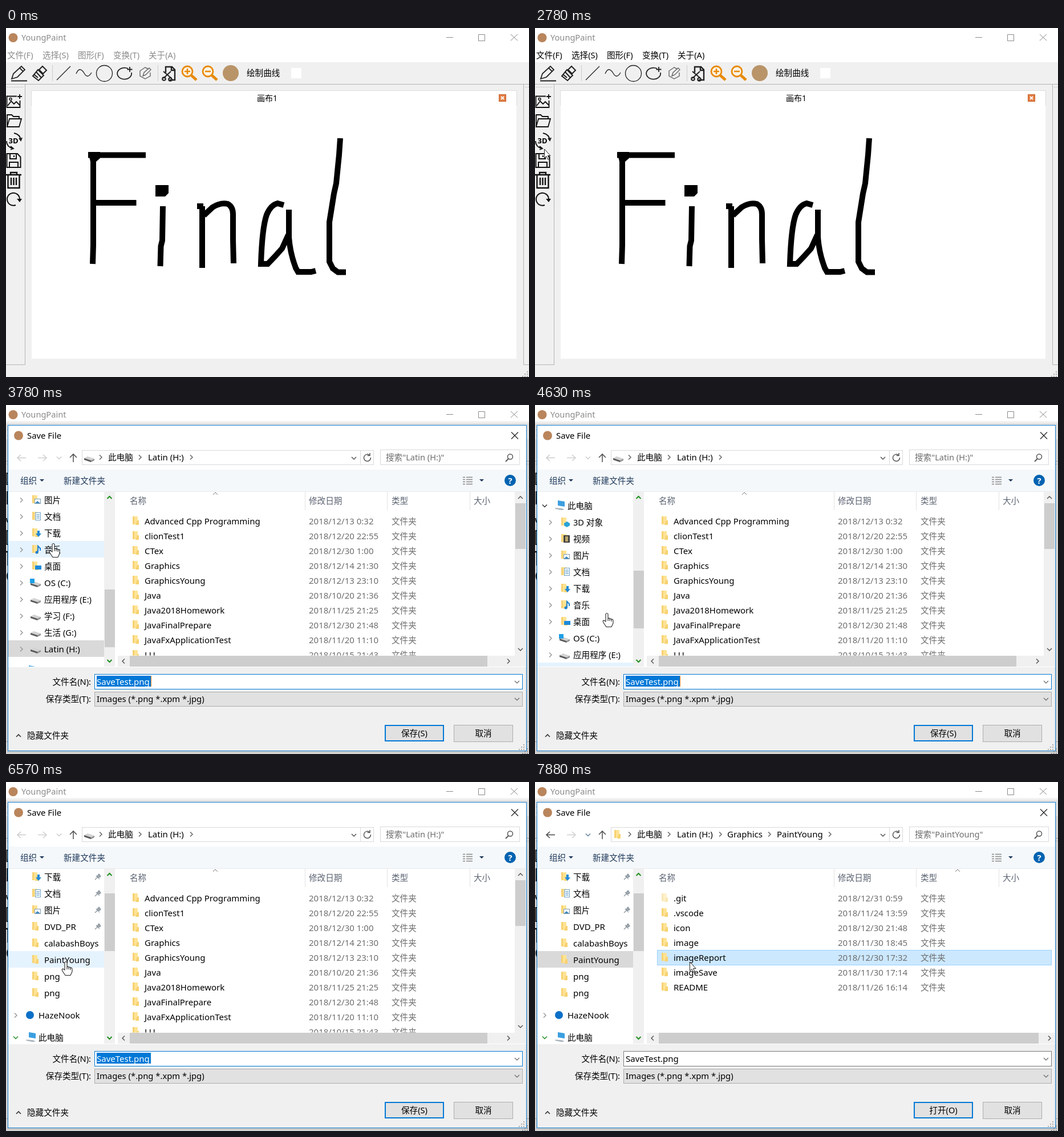
An HTML page that plays this animation: 917x611 px, repeating every 8000 ms.

```html
<!DOCTYPE html>
<html lang="zh-CN">
<head>
<meta charset="utf-8">
<title>Paint</title>
<style>
html, body { margin: 0; width: 100%; height: 100%; overflow: hidden; background: #fff; }
svg { display: block; width: 917px; height: 611px; font-family: "Noto Sans", "Noto Sans CJK SC", "Noto Sans CJK", sans-serif; }
</style>
</head>
<body>
<svg id="stage" viewBox="0 0 917 611"></svg>
<script>
const LOOP = 8000;
const stage = document.getElementById('stage');

const rect = (x, y, w, h, fill, stroke = 'none', sw = 1) =>
  `<rect x="${x}" y="${y}" width="${w}" height="${h}" fill="${fill}" stroke="${stroke}" stroke-width="${sw}"/>`;
const line = (d, color = '#222', w = 1, fill = 'none') =>
  `<path d="${d}" fill="${fill}" stroke="${color}" stroke-width="${w}"/>`;
const shape = (d, fill) => `<path d="${d}" fill="${fill}"/>`;
const disc = (x, y, r, fill, stroke = 'none', w = 1) =>
  `<circle cx="${x}" cy="${y}" r="${r}" fill="${fill}" stroke="${stroke}" stroke-width="${w}"/>`;
const group = (x, y, body) => `<g transform="translate(${x} ${y})">${body}</g>`;

// y is the optical middle of the line; Latin runs are set a touch larger than Chinese ones
function text(s, x, y, color = '#000', anchor = 'start', size) {
  size = size || (/[^\x00-\x7f]/.test(s) ? 14.6 : 15);
  return `<text x="${x}" y="${y + 5.3}" font-size="${size}" fill="${color}" text-anchor="${anchor}">${s}</text>`;
}

const TURNS = { right: 'M-2-4L2 0L-2 4', left: 'M2-4L-2 0L2 4', down: 'M-4-2L0 2L4-2', up: 'M-4 2L0-2L4 2' };
const chevron = (dir, x, y, color = '#555', w = 1.5) => group(x, y, line(TURNS[dir], color, w));
const triangle = (x, y) => shape(`M${x - 4} ${y - 2}h8l-4 4z`, '#1e395b');

function grip(x, y) {
  let s = '';
  for (let i = 0; i < 3; i++) for (let j = 0; j <= i; j++) s += rect(x - j * 4, y - 8 + i * 4, 2, 2, '#aaa');
  return s;
}

/* ---------- paint window ---------- */

const toolbar =
  line('M10 89L13 80L27 67L33 73L20 86ZM24 70L30 76M9 92.5H37', '#222', 1.8) +
  line('M64 67L71 74L65 80L58 73ZM56 73L66 83L57 92L47 84ZM53 77L62 87M50 82L56 87', '#222', 2) +
  line('M81.5 65V93M266.5 65V93', '#ccc') +
  line('M89 91L113 67M123 80Q129 66 137 79Q143 90 150 78', '#222', 1.3) +
  disc(172.5, 79.5, 14, 'none', '#222', 1.3) +
  line('M214 71A12.5 10 0 1 0 220 78M217 68V77M212.500 72.500H221.500', '#222', 1.8) +
  line('M250 72L244 69L235 75V84L244 89L253 84V78M240 84L242 78L251 70L254 73L245 82Z', '#666', 1.4) +
  line('M280 78V68H291L296 73V91H287M290 68V74H296', '#222', 2.4) +
  line('M276 76L290 88M276 88L289 76', '#222', 2) +
  disc(277, 89, 2.8, 'none', '#222', 2) + disc(288, 90, 2.8, 'none', '#222', 2) +
  [0, 36].map(dx => group(dx, 0,
    disc(318, 76, 9, '#fff6e6', '#e88a08', 2.8) +
    line('M325 83L334 91', '#e88a08', 5) +
    line(dx ? 'M313 76H323' : 'M313 76H323M318 71V81', '#e88a08', 2.6))).join('') +
  disc(394, 79, 14, '#b99468') +
  text('绘制曲线', 422, 78.5) + rect(500, 70, 18, 18, '#fff');

const dock =
  line('M19 119.500H1.500V139H24.500V127M24 116V124M20 120H28M3 136L9 128L14 133L18 129L24 135', '#111', 1.8) +
  disc(8, 124.5, 2, 'none', '#111', 1.5) +
  line('M2 172V152H10L13 155H23V159M2 173L6 159H27L23 173Z', '#111', 1.8) +
  line('M14 184Q25 186 26 197M23 193L26 197L28 192M12 211Q1 208 1 198M8 207L13 211L8 213', '#111', 1.8) +
  `<text x="13" y="202" font-size="13" font-weight="700" text-anchor="middle">3D</text>` +
  line('M1.500 220H20L25.500 226V244H1.500ZM7 220V229H18V220M6 244V235H21V244M14 223V226', '#111', 2) +
  line('M0 257H27M8 257V253H19V257M3.500 257V280H23.500V257M9 262V275M13.500 262V275M18 262V275', '#111', 2.4) +
  line('M17 310A11 11 0 1 1 24 299', '#111', 2) + shape('M19 299H28L24 305Z', '#111');

const lettering = line(
  'M144 222.500H245M153 218V380L152 413M158 306H228.500' +
  'M275 312L274 372L271.500 382L270.500 417M335 312H346M344 312V420' +
  'M347 328L362 314Q376 305 389 308Q398 313 398 326V370L399 412' +
  'M487 310L476 307Q464 310 457 327Q449 350 447 413L459 413Q472 400 484 386L495 362' +
  'M496 318V366Q498 394 508 420L512 427H535L543 425' +
  'M586 193L584 222L579 272L575 290L567 340V409L573 421L582 427.500H596', '#000', 10) +
  shape('M144 217H165V228L158 234H148ZM262 275H285V289L279 295H262Z', '#000');

function paintWindow(t) {
  const active = t >= 1820 && t < 2700;
  const ink = active ? '#000' : '#8a8a8a';
  const menuInk = t >= 1820 ? '#000' : '#8a8a8a';
  const menus = ['文件(F)', '选择(S)', '图形(F)', '变换(T)', '关于(A)'];
  const saveHot = t >= 1500 && t < 2380;
  const spinHot = t >= 1340 && t < 1500;
  return rect(0, 0, 917, 611, '#f0f0f0') + rect(0, 0, 917, 60, '#fff') +
    disc(12.5, 17, 8, '#b9855c') + text('YoungPaint', 27, 16.5, ink, 'start', 14.6) +
    line('M772 16.500H784M828.500 11.500H839.500V22.500H828.500ZM885 11L897 22M897 11L885 22', ink) +
    menus.map((m, i) => text(m, 2 + i * 62, 47.5, menuInk)).join('') +
    line('M0 98.500H917M33.500 98V589.500H0M907.500 98V589.500H917', '#b4b4b4') +
    `<path d="M2 103.500H32M910 103.500H917" stroke="#999" stroke-dasharray="1 2"/>` +
    (spinHot ? rect(0, 180, 31, 34, '#d8e6f2') : '') +
    (saveHot ? rect(0, 214, 31, 34, t >= 1820 && t < 1990 ? '#c0dcf3' : '#d8e6f2') : '') +
    toolbar + dock +
    rect(45, 110, 850, 469, '#fff') + line('M44.500 136V109.500H895.500V136', '#dcdcdc') +
    text('画布1', 458, 123, '#000', 'middle', 14) +
    rect(864.5, 116.5, 12, 12, '#e27d43', '#c9622b') + line('M868 120L873 125M873 120L868 125', '#fff', 1.8) +
    lettering + grip(913, 609);
}

/* ---------- save dialog ---------- */

const folder = (x, y, faint) =>
  `<g opacity="${faint ? .5 : 1}">` + rect(x, y - 8, 9, 14, '#ffe394') +
  shape(`M${x} ${y - 8}h3v14h-3zM${x + 8} ${y - 1}h3v8h-6z`, '#f7d272') + '</g>';
const drive = (x, y) => shape(`M${x} ${y}l6-3l12 4l-6 3z`, '#d2d2d2') +
  shape(`M${x} ${y}l12 4v3l-12-4z`, '#585858') + shape(`M${x + 12} ${y + 4}l6-3v3l-6 3z`, '#929292');
const monitor = (x, y) => shape(`M${x + 5} ${y - 9}l12 2v9l-12-2z`, '#3b9fe0') +
  shape(`M${x} ${y + 4}l12 1l5 2l-5 1l-11-2z`, '#a6b1ba');

const badges = {
  down: shape('M55-4h4v5h3l-5 6l-5-6h3z', '#2089d8'),
  doc: rect(51.5, -6.5, 9, 13, '#fff', '#6c9fc5') + line('M53-3h6M53 0h6M53 3h6', '#3d87bd'),
  pic: rect(50.5, -1.5, 10, 8, '#fff', '#7b9bb0') + shape('M51 6l4-4l5 4z', '#3d87bd'),
  music: line('M56 5V-6L60-2V2', '#1c7fd0', 2) + disc(54, 5, 2.5, '#1c7fd0'),
  desk: rect(51, -1, 11, 7, '#1c8adb'),
  cube: shape('M51 2l5-3l5 3v4l-5 3l-5-3z', '#27a3d8'),
  film: rect(50, -6, 11, 13, '#444') + rect(53, -4, 5, 9, '#b9a56a'),
};

// [label, icon, pinned]; tree y is each row's middle when scrolled to the quick-access group
const quick = [['下载', 'down', 1], ['文档', 'doc', 1], ['图片', 'pic', 1], ['DVD_PR', 'folder', 1],
  ['calabashBoys', 'folder'], ['PaintYoung', 'folder'], ['png', 'folder'], ['png', 'folder']];
const places = [['3D 对象', 'cube'], ['视频', 'film'], ['图片', 'pic'], ['文档', 'doc'], ['下载', 'down'],
  ['音乐', 'music'], ['桌面', 'desk'], ['OS (C:)', 'system'], ['应用程序 (E:)', 'drive'],
  ['学习 (F:)', 'drive'], ['生活 (G:)', 'drive'], ['Latin (H:)', 'drive']];
const tree = [
  ...quick.map(([label, icon, pin], i) => ({ label, icon, pin, quick: true, y: 166 + 29 * i })),
  { label: 'HazeNook', icon: 'cloud', top: true, y: 408 },
  { label: '此电脑', icon: 'pc', top: true, y: 447 },
  ...places.map(([label, icon], i) => ({ label, icon, y: 476 + 29 * i })),
  { label: '网络', icon: 'pc', top: true, y: 833 },
];

function treeIcon(icon) {
  if (icon === 'cloud') return disc(42, 0, 7, '#0a70c8');
  if (icon === 'pc') return monitor(35, 0);
  if (icon === 'drive') return drive(43, 1);
  if (icon === 'system') return drive(43, 1) + rect(42, -7, 8, 8, '#1fa0e6');
  return folder(46, 0) + (badges[icon] || '');
}

function treePane(t, cur) {
  const scroll = t < 4560 ? 368 : t < 4950 ? 271 : t < 5030 ? 180 : t < 5100 ? 90 : 0;
  const hoverScroll = t < 4720 ? 368 : scroll;
  const chosen = t < 6730 ? 'Latin (H:)' : 'PaintYoung';
  const chosenFill = t < 6730 || t >= 7880 ? '#d9d9d9' : '#cce8ff';
  let s = '';
  for (const item of tree) {
    const y = item.y - scroll;
    if (y < 130 || y > 480) continue;
    const hot = cur.x < 172 && Math.abs(cur.y - item.y + hoverScroll) < 14.5;
    const fill = item.label === chosen ? chosenFill : hot ? '#e5f3ff' : '';
    const open = item.label === '此电脑';
    s += group(0, y,
      (fill ? rect(4, -15, 168, 29, fill) : '') +
      (item.quick ? '' : chevron(open ? 'down' : 'right', item.top ? 17 : 27, 0.5,
        open ? (scroll ? '#333' : '#229022') : '#999')) +
      treeIcon(item.icon) + text(item.label, item.top ? 57 : 67, 0.4) +
      (item.pin ? line('M156 5L160 1M158-2L164 4M160-1L163-5L166-1L162 2Z', '#8a949c', 1.3, '#a4adb4') : ''));
  }
  return `<g clip-path="url(#treeClip)">${s}</g>` + rect(172, 152, 19, 306, '#f0f0f0') +
    rect(173, 195 + Math.round(scroll * .349), 18, 101, '#cdcdcd') +
    chevron('up', 181.5, 162, '#229022', 2) + chevron('down', 181.5, 448, '#229022', 2);
}

const driveRows = [['Advanced Cpp Programming', '12/13 0:32'], ['clionTest1', '12/20 22:55'],
  ['CTex', '12/30 1:00'], ['Graphics', '12/14 21:30'], ['GraphicsYoung', '12/13 23:10'],
  ['Java', '10/20 21:36'], ['Java2018Homework', '11/25 21:25'], ['JavaFinalPrepare', '12/30 21:48'],
  ['JavaFxApplicationTest', '11/20 11:10'], ['LU', '10/15 21:43']];
const projectRows = [['.git', '12/31 0:59'], ['.vscode', '11/24 13:59'], ['icon', '12/30 21:48'],
  ['image', '11/30 18:45'], ['imageReport', '12/30 17:32'], ['imageSave', '11/30 17:14'],
  ['README', '11/26 16:14']];

function listPane(t, cur, inside) {
  const rows = inside ? projectRows : driveRows;
  const hot = cur.x > 213 ? Math.floor((cur.y - 191) / 26) : -1;
  const body = rows.map(([name, date], i) => {
    const y = 204 + 26 * i;
    const picked = t >= 7800 && i === 4;
    return (picked ? rect(214.5, y - 13.5, 691, 26, '#cce8ff', '#99d1ff')
      : hot === i ? rect(214, y - 13, 692, 26, '#e5f3ff') : '') +
      folder(222, y - 1, name === '.git') + text(name, 243, y) +
      text('2018/' + date, 531, y, '#6d6d6d') + text('文件夹', 676, y, '#6d6d6d');
  }).join('');
  const heads = [['名称', 217], ['修改日期', 531], ['类型', 676], ['大小', 820]];
  return heads.map(([h, x]) => text(h, x, 167.5, '#5a6270')).join('') +
    line('M524.500 152V184M668.500 152V184M813.500 152V184', '#e2e2e2') +
    chevron('up', inside ? 741 : 367, 155, '#777', 1) +
    `<g clip-path="url(#listClip)">${body}</g>` +
    rect(196, 439, 715, 19, '#f0f0f0') + rect(217, 439, inside ? 666 : 627, 19, '#cdcdcd') +
    chevron('left', 206, 448.5) + chevron('right', inside ? 902 : 881, 448.5) +
    (inside ? '' : rect(892, 152, 19, 287, '#f0f0f0') + rect(893, 172, 18, 80, '#cdcdcd') +
      chevron('up', 902, 162) + chevron('down', 902, 428));
}

function addressBar(inside) {
  const crumbs = [['此电脑', 179, 235], ['Latin (H:)', 249, 325]];
  if (inside) crumbs.push(['Graphics', 337, 411], ['PaintYoung', 424, 517]);
  const back = inside ? '#444' : '#ccc';
  return line('M35 92.500H20M26 87L20 92.500L26 98', back, 1.5) +
    line('M56 92.500H71M65 87L71 92.500L65 98', '#d0d0d0', 1.5) +
    chevron('down', 93, 92.5, inside ? '#667f9b' : '#ccc') +
    line('M118 100V86M112 92L118 86L124 92', '#555', 1.6) +
    rect(133.5, 79.5, 511, 25, '#fff', '#d9d9d9') + line('M621.500 80V104', '#d9d9d9') +
    (inside ? folder(139, 92) : drive(137, 93)) + chevron('right', 166, 91.5, '#666') +
    crumbs.map(([s, x, next]) => text(s, x, 91.5) + chevron('right', next, 91.5, '#666')).join('') +
    chevron('down', 610, 93) +
    line('M637 87.500A6 6 0 1 0 639.500 92M638 84V88.500H633.500', '#555', 1.5) +
    rect(656.5, 78.5, 244, 26, '#fff', '#d9d9d9') +
    text(`搜索"${inside ? 'PaintYoung' : 'Latin (H:)'}"`, 666, 92, '#6d6d6d') +
    disc(884, 90.5, 4.5, 'none', '#555', 1.5) + line('M881 94L876 99', '#555', 1.8);
}

function button(x, label, main) {
  return (main ? rect(x + 1, 561, 102, 27, '#e1e1e1', '#0078d7', 2)
    : rect(x + .5, 560.5, 103, 29, '#e1e1e1', '#adadad')) + text(label, x + 52, 575, '#000', 'middle');
}

const shadow = [3, 7, 12, 18].map(w =>
  `<rect x="4" y="37" width="908" height="569" fill="none" stroke="#000" stroke-opacity=".05" stroke-width="${w}"/>`).join('');

function dialog(t, cur) {
  const inside = t >= 7030;
  const loaded = t >= 3400;
  const caret = loaded && Math.floor((t - 3540) / 530) % 2 === 0;
  return `<g opacity="${t < 3100 ? .6 : 1}">` + shadow +
    rect(3.5, 35.5, 909, 570, '#fff', '#1883d7') +
    disc(22, 53.5, 8, '#b9855c') + text('Save File', 37, 53.5, '#000', 'start', 14.9) +
    line('M886 47.500L898 59.500M898 47.500L886 59.500', '#222', 1.2) +
    addressBar(inside) +
    rect(4, 113, 908, 38, '#f5f8fa') + line('M4 151.500H912', '#e8ebee') +
    text('组织', 25, 132.5, '#1e395b') + triangle(63, 132) +
    text('新建文件夹', 101, 132.5, '#1e395b') +
    line('M801 126.500H805M801 130.500H805M801 134.500H805M801 138.500H805M807 126.500H818M807 130.500H818M807 134.500H818M807 138.500H818', '#888', 1.5) +
    triangle(834, 132) + disc(884, 132, 10, '#0063b1') +
    `<text x="884" y="137.500" fill="#fff" font-size="15" font-weight="700" text-anchor="middle">?</text>` +
    (loaded ? treePane(t, cur) + listPane(t, cur, inside) : '') +
    rect(4, 459, 908, 146, '#f0f0f0') +
    text('文件名(N):', 149, 485, '#000', 'end') + text('保存类型(T):', 149, 515, '#000', 'end') +
    rect(155.5, 471.5, 750, 26, '#fff', inside ? '#7a7a7a' : '#0078d7') +
    (inside ? '' : rect(159, 474, 95, 19, '#0078d7') + (caret ? rect(254, 474, 1, 19, '#ff8728') : '')) +
    text('SaveTest.png', 159, 484.3, inside ? '#000' : '#fff') + chevron('down', 896, 485, '#666', 1.2) +
    rect(155.5, 502.5, 750, 25, '#e1e1e1', '#adadad') +
    text('Images (*.png *.xpm *.jpg)', 159, 515, '#000', 'start', 14.8) + chevron('down', 896, 515, '#666', 1.2) +
    chevron('up', 22, 579, '#333', 1.6) + text('隐藏文件夹', 37, 578.5) +
    button(664, t >= 7800 ? '打开(O)' : '保存(S)', true) + button(785, '取消') +
    grip(907, 602) + '</g>';
}

/* ---------- pointer ---------- */

const track = [[0, 830, 640], [120, 815, 600], [500, 480, 400], [890, 143, 257], [980, 132, 250],
  [1340, 26, 208], [1500, 17, 224], [1590, 18, 225], [1989, 18, 225], [1990, 15, 221], [2060, 17, 217],
  [2230, 16, 213], [2380, 17, 204], [2460, 16, 212], [3400, 16, 212], [3780, 83, 242], [4170, 124, 350],
  [4330, 126, 364], [5420, 126, 364], [5880, 106, 315], [6570, 105, 314], [7030, 105, 314],
  [7650, 268, 312], [7800, 271, 315], [8000, 271, 315]];

function pointerAt(t) {
  let i = 0;
  while (i < track.length - 2 && t >= track[i + 1][0]) i++;
  const [t0, x0, y0] = track[i], [t1, x1, y1] = track[i + 1];
  const k = Math.floor((t - t0) / 77) * 77 / (t1 - t0); // the pointer moves about 13 times a second
  return { x: Math.round(x0 + (x1 - x0) * k), y: Math.round(y0 + (y1 - y0) * k) };
}

const arrow = line('M.5 0V15.500L4 12.500L6.500 18L9 17L6.500 11.500H11Z', '#222', 1, '#fff');
const hand = line('M-2 2Q0-1 2 2V10Q4 8 5 10.500Q7 9 8 11.500Q11 10 11 14V18L8 24.500H-1L-6 17Q-8 13-5 13L-2 15ZM2 10V14M5 11V14M8 12V15', '#222', 1.1, '#fff');

const defs = '<defs><clipPath id="treeClip"><path d="M4 152H172V458H4Z"/></clipPath>' +
  '<clipPath id="listClip"><path d="M192 185H911V438.500H192Z"/></clipPath></defs>';

let shown = '';
function draw(t) {
  const cur = pointerAt(t);
  const overTree = t >= 3400 && cur.x < 172;
  const picture = defs + paintWindow(t) + (t >= 3020 ? dialog(t, cur) : '') +
    (t < 120 ? '' : group(cur.x, cur.y, overTree ? hand : arrow));
  if (picture !== shown) stage.innerHTML = shown = picture;
}

const start = performance.now();
function tick() {
  draw((performance.now() - start) % LOOP);
  requestAnimationFrame(tick);
}
tick();
</script>
</body>
</html>
```
